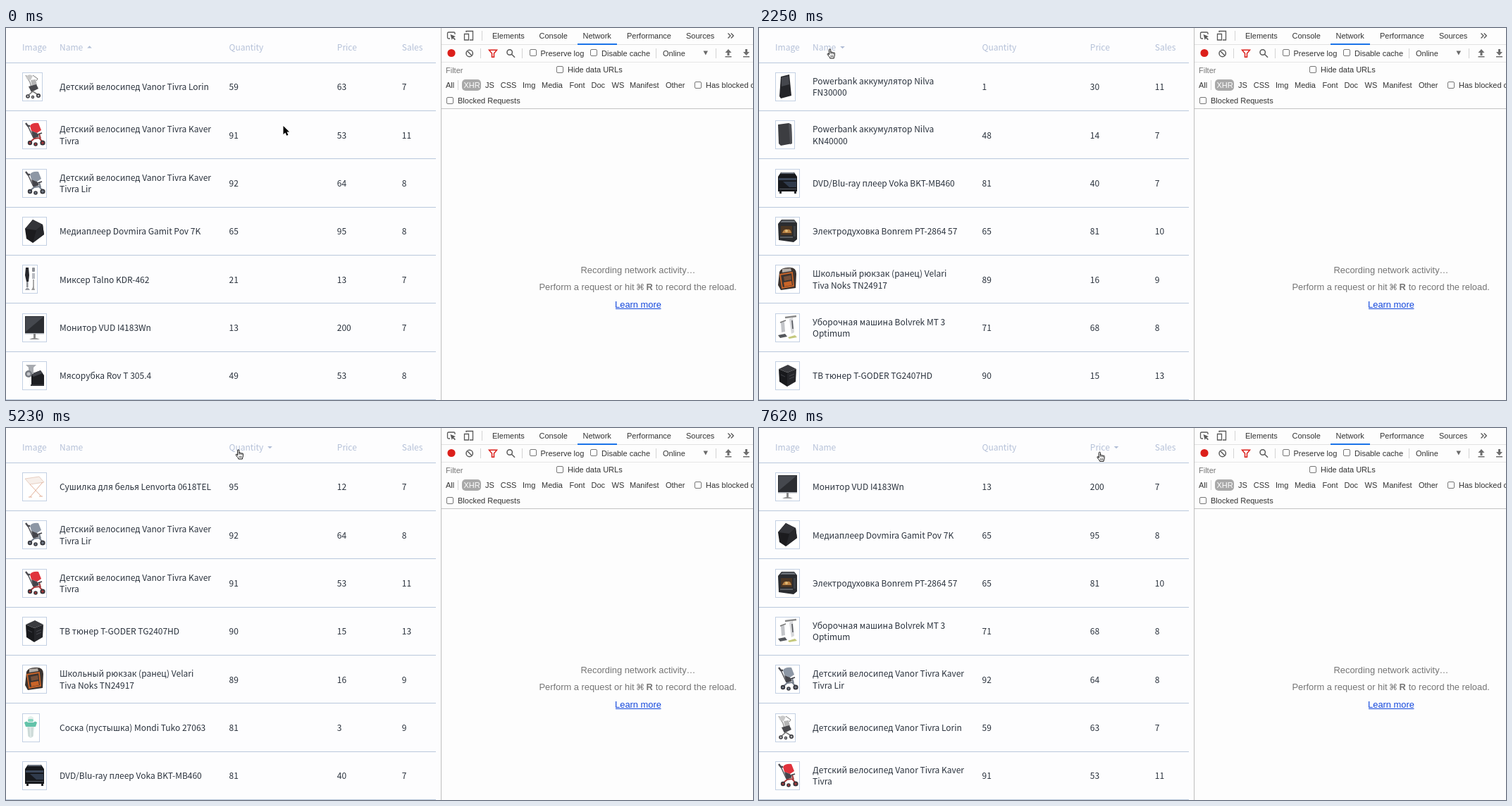
Write an HTML page that moves like this. It is 1060 by 528 pixels and loops after 8 s.

```html
<!DOCTYPE html>
<html lang="ru">
<head>
<meta charset="utf-8">
<title>Sortable table</title>
<style>
html, body { margin: 0; width: 100%; height: 100%; overflow: hidden; background: #fdfdfe; }
svg { display: block; width: 1060px; height: 528px; }
text { white-space: pre; }
.table { font: 12px "Noto Sans CJK JP", "Noto Sans CJK SC", "Noto Sans", sans-serif; fill: #29313c; }
.head { fill: #b5c1d8; }
.tools { font: 11px "Liberation Sans", Arial, sans-serif; fill: #333; }
.hint { font-size: 12.87px; fill: #757575; }
.view { visibility: hidden; }
</style>
</head>
<body>
<svg id="stage" viewBox="0 0 1060 528"></svg>
<script>
const LOOP = 8000;
const ROW_TOP = 49.2, ROW_H = 68.35;

const fill = (color, d) => `<path fill="${color}" d="${d}"/>`;
const line = (color, width, d) => `<path fill="none" stroke="${color}" stroke-width="${width}" d="${d}"/>`;
const dot = (color, x, y, r) => `<circle fill="${color}" cx="${x}" cy="${y}" r="${r}"/>`;
const rect = (color, x, y, w, h, rx = 0) =>
  `<rect fill="${color}" x="${x}" y="${y}" width="${w}" height="${h}" rx="${rx}"/>`;
const text = (x, y, s, attrs = '') => `<text x="${x}" y="${y}" ${attrs}>${s}</text>`;
const wheel = (x, y, r, hub) => dot('#34343a', x, y, r) + dot(hub, x, y, r / 2);

const trike = (canopy, frame) =>
  line('#4a4a50', 2.4, 'M5 4L8 8L11 8') + line('#4a4a50', 1.4, 'M8 8L16 25') +
  fill(canopy, 'M11 8Q14 3 23 4L27 14L21 18L13 15Z') +
  fill('#45454b', 'M13 15L21 18L24 23L16 26Z') +
  line(frame, 2, 'M11 31L17 26L24 25L30 32M24 19L26 26') +
  line('#3a3a40', 1.5, 'M22 20L28 18') +
  wheel(11, 32, 3.2, frame) + wheel(19, 34, 2.8, frame) + wheel(29, 32, 3.6, frame);

const cube = (top, left, right) =>
  fill(left, 'M5 11L17 16V36L6 29Z') + fill(right, 'M17 16L30 11L29 29L17 36Z') + fill(top, 'M5 11L18 5L30 11L17 16Z');

const thumbs = {
  grand: line('#888', 1.2, 'M5 4L11 14L15 28') + fill('#c9c9c9', 'M5 6Q10 1 15 5L12 11L7 10Z') +
    line('#777', 1, 'M15 4L22 9L20 12') + fill('#b5b5b5', 'M12 11L19 10L21 18L14 20Z') +
    fill('#4a4a4e', 'M9 20L20 17L23 23L13 28Z') + line('#777', 1.5, 'M8 33L15 27L23 32') +
    wheel(8, 34, 2.8, '#bbb') + wheel(15, 35, 2.2, '#bbb') + wheel(23, 33, 3, '#bbb'),
  racer: trike('#e0333d', '#a8383a'),
  air: trike('#8d97a5', '#747d8a'),
  media: fill('#1b1b1e', 'M4 17L15 4L29 11L31 25L15 37L6 31Z') + fill('#333439', 'M15 4L29 11L20 19L4 17Z') +
    fill('#26272b', 'M20 19L29 11L31 25L15 37Z'),
  mixer: fill('#25262b', 'M5 4H9L10 15L9 24H6L4 15Z') + rect('#8b8e94', 6, 24, 2.5, 8) + fill('#9a9da3', 'M4 36Q7 29 11 36Z') +
    rect('#8d9096', 14, 4, 4, 6, 1) + rect('#b9bcc2', 14, 12, 4, 8) + rect('#aaa', 15, 21, 2, 11) + fill('#999', 'M13 36L16 30L18 36Z'),
  monitor: rect('#2b2d31', 4, 4, 27, 24) + fill('#45484e', 'M5 5H30L5 26Z') + rect('#aeb2b8', 4, 28, 27, 1.5) +
    rect('#888', 16, 29, 3, 6) + fill('#888', 'M10 37Q17 33 25 37Z'),
  grinder: fill('#1d1e22', 'M13 18L26 13L31 20V33H13Z') + fill('#41434a', 'M13 18L26 13L29 17L16 22Z') +
    fill('#a8abb0', 'M5 5H20L16 9V18H9V9Z') + dot('#777b82', 9, 18, 5) + dot('#c3c5c9', 9, 18, 2.5) + rect('#33353a', 12, 33, 19, 2),
  bankS: fill('#242529', 'M8 6L20 3L23 33L8 37L6 34Z') + fill('#45474d', 'M9 7L19 5L20 17L9 20Z'),
  bankR: fill('#3c3d41', 'M4 6L19 4L23 6L24 33L8 36L5 33Z') + fill('#505156', 'M19 4L23 6L24 33L21 34Z'),
  dvd: fill('#17191d', 'M4 11L8 5H27L31 11V32H4Z') + fill('#69717d', 'M7 7L9 5H26L28 7Z') + rect('#3b475a', 5, 13, 25, 3) +
    fill('#303b4c', 'M11 18H30V26H20Z') + rect('#555b65', 6, 28, 24, 1) + rect('#202226', 6, 32, 3, 3) + rect('#202226', 27, 32, 3, 3),
  oven: fill('#2a2c30', 'M4 10L9 4H27L31 9V32L26 36L5 33Z') + fill('#666b72', 'M7 8L10 5H27L29 8Z') + rect('#4a3523', 8, 13, 16, 13) +
    fill('#b98143', 'M10 23Q12 17 17 18Q22 17 23 23Z') + dot('#dfba78', 16, 20, 2) + rect('#3d4045', 26, 13, 3, 15) + line('#8a8d92', 1, 'M7 29H25'),
  bag: fill('#3a3330', 'M6 10Q9 3 21 4Q30 4 30 13L29 33L8 36L4 29Z') + line('#c96428', 1.8, 'M7 14L24 11L26 30L10 33Z') +
    fill('#b3aca6', 'M10 6L22 5L23 9L10 11Z') + fill('#77503a', 'M12 17L22 15L23 21L13 23Z') + fill('#c96428', 'M12 25L23 23L24 29L13 31Z'),
  vacuum: line('#888', 2.5, 'M14 6L30 4') + fill('#d6d7da', 'M20 8L25 6L27 27L23 29Z') + line('#55585e', 1.6, 'M24 10L25 22') +
    fill('#c3c5c9', 'M8 13L13 12L14 26L9 27Z') + line('#777', 1.5, 'M7 13L15 10') + fill('#54575c', 'M4 31L14 29L17 33L7 35Z') +
    fill('#c4c87c', 'M18 34L28 31L31 34L20 36Z'),
  tuner: cube('#3a3b3f', '#18191c', '#242529') + line('#55575d', .7, 'M8 19L14 22M20 21L27 18M20 25L27 22'),
  dryer: fill('#f7efea', 'M4 9L24 6L31 14L11 17Z') + line('#e3c6b6', .8, 'M4 9L24 6L31 14L11 17Z') +
    line('#dfa68d', .9, 'M11 17L27 34M29 14L11 35M9 35H14M24 34H29'),
  happy: fill('#e4efec', 'M8 6Q12 2 16 6V15H8Z') + fill('#63c3aa', 'M3 13Q7 10 8 13H16Q18 10 21 13L19 19H5Z') + rect('#8ad6c2', 8, 8, 8, 4, 2) +
    fill('#dce7e5', 'M7 19H17L16 32Q12 38 8 32Z') + line('#b3c5c2', .8, 'M9 20L10 33M14 20L14 33'),
  medela: fill('#f3e7ad', 'M15 5Q17 2 20 5L21 14L28 19L30 31Q17 38 5 31L7 20L14 14Z') + fill('#e3c655', 'M6 24Q17 19 29 24L30 31Q17 37 5 31Z') +
    fill('#f8efc7', 'M10 23Q17 18 25 23L22 29H13Z') + line('#d7c16a', .8, 'M14 14Q18 17 21 14'),
  nuk: fill('#e3e5e8', 'M5 10Q10 2 17 6Q25 2 30 10L28 25Q25 35 17 36Q9 34 7 25Z') + dot('#f7f7f8', 17, 19, 8) +
    line('#c6cace', 1, 'M10 12Q17 7 25 12M11 25Q17 31 24 25M14 18Q17 13 21 18L19 25H15Z') + dot('#cfd2d6', 9, 13, 2) + dot('#cfd2d6', 26, 13, 2),
  tommee: fill('#e9b9c7', 'M15 6Q22 1 29 7Q33 13 30 25Q26 33 18 32Z') + fill('#332c2e', 'M6 12Q13 2 21 10Q28 17 25 29Q19 39 11 33Q4 25 6 12Z') +
    fill('#d9b59c', 'M10 16Q14 9 19 14Q23 20 21 28Q16 33 12 28Q8 22 10 16Z') + dot('#3c3032', 15, 18, 4) + fill('#614447', 'M13 23H19L18 30H14Z')
};
const thumbWidth = { grand: 28, mixer: 21, bankS: 28, bankR: 27, happy: 24 };

const goods = {
  grand: ['Детский велосипед Vanor Tivra Lorin', 59, 63, 7],
  racer: ['Детский велосипед Vanor Tivra Kaver|Tivra', 91, 53, 11],
  air: ['Детский велосипед Vanor Tivra Kaver|Tivra Lir', 92, 64, 8],
  media: ['Медиаплеер Dovmira Gamit Pov 7K', 65, 95, 8],
  mixer: ['Миксер Talno KDR-462', 21, 13, 7],
  monitor: ['Монитор VUD I4183Wn', 13, 200, 7],
  grinder: ['Мясорубка Rov T 305.4', 49, 53, 8],
  bankS: ['Powerbank аккумулятор Nilva|FN30000', 1, 30, 11],
  bankR: ['Powerbank аккумулятор Nilva|KN40000', 48, 14, 7],
  dvd: ['DVD/Blu-ray плеер Voka BKT-MB460', 81, 40, 7],
  oven: ['Электродуховка Bonrem PT-2864 57', 65, 81, 10],
  bag: ['Школьный рюкзак (ранец) Velari|Tiva Noks TN24917', 89, 16, 9],
  vacuum: ['Уборочная машина Bolvrek MT 3|Optimum', 71, 68, 8],
  tuner: ['ТВ тюнер T-GODER TG2407HD', 90, 15, 13],
  dryer: ['Сушилка для белья Lenvorta 0618TEL', 95, 12, 7],
  happy: ['Соска (пустышка) Mondi Tuko 27063', 81, 3, 9],
  medela: ['Соска (пустышка) Rovena Timbo', 10, 12, 8],
  nuk: ['Соска (пустышка) DRO 38416205', 20, 3, 14],
  tommee: ['Соска (пустышка) Gumbon Fidena|52194076', 28, 6, 7]
};
// Neutral keys for the thumbnails and goods of each view: arrow x, arrow direction, visible rows
const views = [
  [118.5, 'up', 'grand racer air media mixer monitor grinder'],
  [118.5, 'down', 'bankS bankR dvd oven bag vacuum tuner'],
  [374.5, 'down', 'dryer air racer tuner bag happy dvd'],
  [374.5, 'up', 'bankS medela monitor nuk mixer tommee bankR'],
  [507, 'down', 'monitor media oven vacuum air grand racer']
];

function row(key, i) {
  const [name, ...numbers] = goods[key];
  const lines = name.split('|');
  const mid = ROW_TOP + ROW_H * (i + .5);
  const base = mid + 4.8;
  const w = thumbWidth[key] || 34;
  return `<g transform="translate(23 ${Math.round(mid - 20.5)})">
    <rect x=".5" y=".5" width="${w}" height="40" fill="#fff" stroke="#c3d0e3"/>${thumbs[key]}</g>` +
    lines.map((s, n) => text(76, base + (n - (lines.length - 1) / 2) * 16.4, s)).join('') +
    numbers.map((v, n) => text([316.5, 469.8, 561.8][n], base, v)).join('');
}

function view([x, dir, keys]) {
  const arrow = dir === 'up' ? `M${x - 3.3} 28.5h6.6l-3.3 -3.3z` : `M${x - 3.3} 26h6.6l-3.3 3.3z`;
  return `<g class="view">${fill('#b0bdd6', arrow)}${keys.split(' ').map(row).join('')}</g>`;
}

function table() {
  const heads = [[23, 'Image'], [76, 'Name'], [316.5, 'Quantity'], [469.8, 'Price'], [561.8, 'Sales']];
  let rules = '';
  for (let i = 0; i < 8; i++) rules += rect('#b9c8dc', 0, Math.round(ROW_TOP + ROW_H * i - .5), 610, 1);
  return `<g class="table"><rect id="hover" width="610" height="${ROW_H - 1}" fill="#f4f5f7"/>${rules}
    <g class="head">${heads.map(([x, s]) => text(x, 32.2, s)).join('')}</g>${views.map(view).join('')}</g>`;
}

function devtools() {
  const box = (x, y) => `<rect x="${x + .5}" y="${y + .5}" width="9" height="9" rx="1.5" fill="#fff" stroke="#767676"/>`;
  const labels = (y, items) => items.map(([x, s]) => text(x, y, s)).join('');
  const divider = (x, y) => rect('#d4d4d4', x, y, 1, 14);
  const icon = '#5a5a5a';
  return `<g class="tools">` +
    rect('#fdfdfd', 617, 0, 443, 528) +
    rect('#e2e2e2', 617, 23, 443, 1) + rect('#e6e6e6', 617, 48, 443, 1) + rect('#c4c4c4', 617, 114, 443, 1) +
    rect('#bdbdbd', 617, 0, 1, 528) + rect('#1a73e8', 811, 22, 56, 2) +
    // tab bar
    line(icon, 1.3, 'M630 15H628Q626.5 15 626.5 13.5V7.5Q626.5 6 628 6H635.5Q637 6 637 7.5V9') +
    fill(icon, 'M630.5 9L638 12L635.2 13.2L638 16L636.8 17.2L634 14.5L632.7 17Z') +
    line(icon, 1.3, 'M653 6V4.5H662.5V17H658M650.5 8.5H656.5V17H650.5Z') + divider(675, 4) +
    labels(15, [[690, 'Elements'], [756.5, 'Console'], [818.5, 'Network'], [881, 'Performance'], [965, 'Sources']]) +
    line(icon, 1.4, 'M1024.5 7.5L1028 11L1024.5 14.5M1028.8 7.5L1032.3 11L1028.8 14.5') +
    // network toolbar
    dot('#dc1f1a', 632, 35.5, 5.6) +
    line(icon, 1.5, 'M653 36a4.7 4.7 0 1 0 9.4 0a4.7 4.7 0 1 0 -9.4 0M654.5 32.6L661 39.3') + divider(673, 29) +
    line('#dc1f1a', 1.5, 'M685.5 31.2H696.5L692.5 36V41.2H689.5V36Z') +
    line(icon, 1.5, 'M711 34.5a3.7 3.7 0 1 0 7.4 0a3.7 3.7 0 1 0 -7.4 0M717.5 37.3L722 41.8') + divider(732, 29) +
    box(743, 30) + box(829, 30) + divider(922, 29) +
    labels(39.5, [[758.5, 'Preserve log'], [845, 'Disable cache'], [932, 'Online']]) +
    fill('#6a6a6a', 'M989.5 32.5H996L992.8 38.5Z') + divider(1007, 29) +
    fill('#6e6e6e', 'M1025 30L1029.5 35H1026.5V39H1023.5V35H1020.5ZM1020.5 40H1029.5V41.5H1020.5Z') +
    fill('#6e6e6e', 'M1050.5 39L1055 34H1052V30H1049V34H1046ZM1046 40H1055V41.5H1046Z') +
    // filters
    text(624, 64, 'Filter', 'fill="#757575"') + box(781, 54) + text(797, 63, 'Hide data URLs') +
    rect('#a9a9a9', 647, 73, 27, 16, 5) + text(649.5, 85, 'XHR', 'fill="#fff"') + rect('#d4d4d4', 641, 74, 1, 14) +
    labels(85, [[624, 'All'], [680, 'JS'], [701.7, 'CSS'], [733, 'Img'], [760, 'Media'], [799.5, 'Font'], [830.5, 'Doc'],
      [859.5, 'WS'], [885, 'Manifest'], [936, 'Other'], [993, 'Has blocked cookies']]) +
    box(977, 76) + box(625, 98) + text(641, 106.5, 'Blocked Requests') +
    // empty state
    `<g class="hint">` + text(897, 347.5, 'Recording network activity…', 'text-anchor="middle"') +
    text(756.5, 372, 'Perform a request or hit') +
    text(894, 372, '⌘', 'style="font:12px \'DejaVu Sans\',sans-serif"') + text(908.5, 372, 'R', 'font-weight="bold"') +
    text(921.8, 372, 'to record the reload.') +
    text(897, 397, 'Learn more', 'text-anchor="middle" fill="#1347dc"') + rect('#1347dc', 865, 398, 64.5, 1) + `</g></g>`;
}

const pointers = `
  <path id="arrow" d="M0 0V12L2.8 9.4L4.8 13.7L6.9 12.8L5 8.6H8.6Z" fill="#000" stroke="#fff" paint-order="stroke"/>
  <g id="hand" stroke="#111" stroke-linejoin="round">
    <path fill="#fff" d="M3 8.8V1.7a1.1 1.1 0 0 1 2.2 0V5.6a1 1 0 0 1 2 .2a1 1 0 0 1 1.9 .4a.9 .9 0 0 1 1.7 .6V9.5C10.8 11.2 9.8 11.7 9.8 13.7H4.3C4 11.8 2 10.5 .8 8.3C.1 7 1.4 6.4 2.2 7.3Z"/>
    <path fill="none" stroke-width=".7" d="M5.2 5.6V7.8M7.2 5.8V7.9M9.1 6.2V8.1M5.3 9.5V12M7 9.5V12M8.6 9.5V12"/>
  </g>`;

const stage = document.getElementById('stage');
// Thumbnail and row keys are shared, so every view is built once and toggled
stage.innerHTML = table() + devtools() + pointers;

// Step tracks: [start ms, value...]
const sortTrack = [[0, 0], [2250, 1], [3440, 0], [5230, 2], [6730, 3], [7620, 4]];
const hoverTrack = [[0, -1], [150, 1], [1650, 0], [1800, -1]];
const pointerTrack = [
  [0, 'arrow', 393.5, 139], [300, 'arrow', 392, 136], [1350, 'arrow', 390.3, 136], [1500, 'arrow', 243, 83],
  [1650, 'arrow', 165, 61], [1800, 'hand', 120, 37.5], [1950, 'hand', 99, 29.5], [2100, 'hand', 96.5, 29.3],
  [4340, 'hand', 205, 36.5], [4490, 'hand', 308.5, 30.5], [4640, 'hand', 323, 30.3], [4790, 'hand', 325.6, 30.3],
  [7020, 'hand', 384, 37.5], [7170, 'hand', 466, 35.5], [7320, 'hand', 479.3, 33.6]
];
const at = (track, t) => track.filter(step => step[0] <= t).pop().slice(1);

const groups = [...document.querySelectorAll('.view')];
const [hover, arrow, hand] = ['hover', 'arrow', 'hand'].map(id => document.getElementById(id));
const show = (el, on) => { el.style.visibility = on ? 'visible' : 'hidden'; };

function render(t) {
  const [sort] = at(sortTrack, t);
  const [hovered] = at(hoverTrack, t);
  const [kind, x, y] = at(pointerTrack, t);
  groups.forEach((g, i) => show(g, i === sort));
  show(hover, hovered >= 0);
  hover.setAttribute('y', ROW_TOP + ROW_H * hovered + .8);
  for (const el of [arrow, hand]) {
    show(el, el.id === kind);
    el.setAttribute('transform', `translate(${x} ${y})`);
  }
}

const start = performance.now();
function frame() {
  render((performance.now() - start) % LOOP);
  requestAnimationFrame(frame);
}
frame();
</script>
</body>
</html>
```
